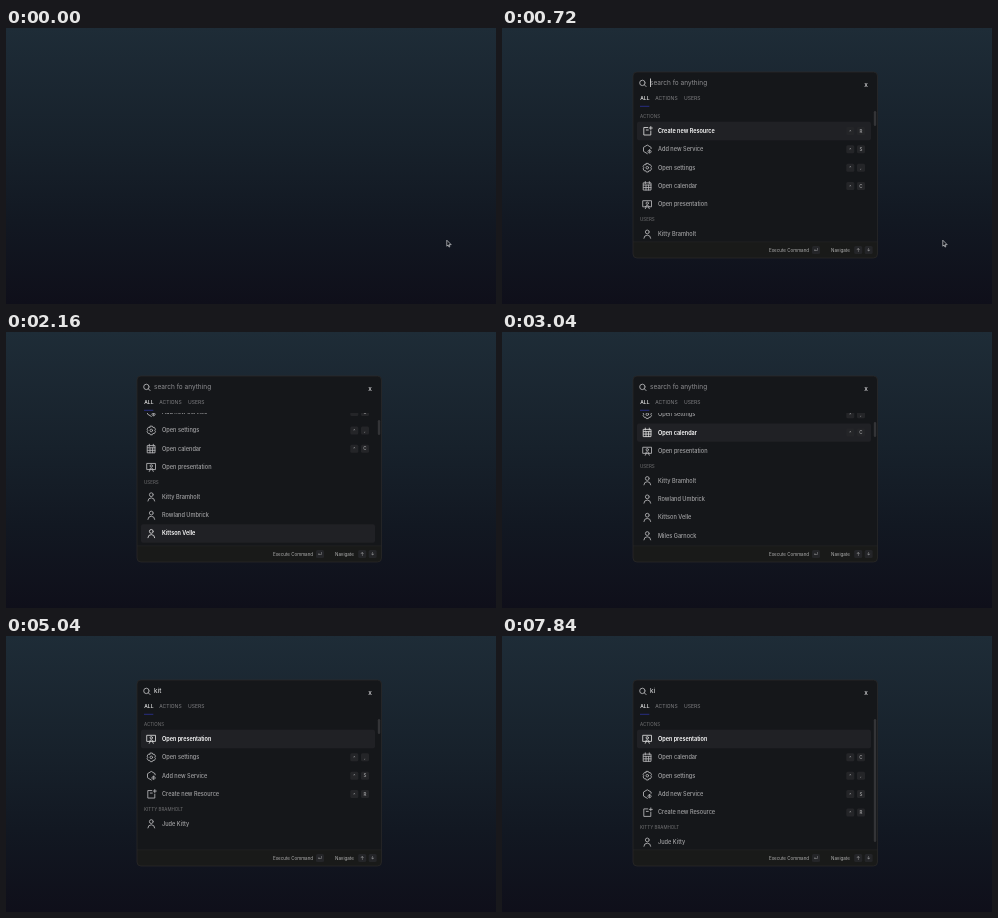
These frames come from a looping animation (490x276 px, 8000 ms). An HTML page with a canvas:

```html
<!DOCTYPE html>
<html lang="en">
<head>
<meta charset="utf-8">
<title>Command palette</title>
<style>
html, body { margin: 0; width: 100%; height: 100%; overflow: hidden; background: #0f0f1a; }
canvas { display: block; width: 490px; height: 276px; }
</style>
</head>
<body>
<canvas id="stage"></canvas>
<script>
const LOOP = 8000, W = 490, H = 276;
const canvas = document.getElementById('stage');
const scale = window.devicePixelRatio || 1;
canvas.width = W * scale;
canvas.height = H * scale;
const ctx = canvas.getContext('2d');

// Icons are drawn around their own centre.
const icons = {
  resource: 'M.5-3.5H-3.5V4H3.5V0M3.5-4.5V-1.5M2-3H5M-1-1H1',
  service: 'M3.8-.8V-2L0-4.3-3.8-2V2L0 4.3M2.2.5A1.6 1.6 0 1 0 2.3.5M2.3 1.2V3',
  settings: 'M-1-4.3H1L1.6-3 3-3.1 4.2-1.2 3.5 0 4.2 1.2 3 3.1 1.6 3 1 4.3H-1L-1.6 3-3 3.1-4.2 1.2-3.5 0-4.2-1.2-3-3.1-1.6-3ZM1.3 0A1.3 1.3 0 1 0-1.3 0A1.3 1.3 0 1 0 1.3 0',
  calendar: 'M-3.7-3.2H3.7V4H-3.7ZM-3.7-1H3.7M-2-4.5V-2.5M2-4.5V-2.5M-1.3-1V4M1.3-1V4M-3.7 1.5H3.7',
  presentation: 'M-4.2-3.7H4.2V2.4H-4.2ZM-2 4.3L-1 2.4M2 4.3L1 2.4M1.2-1.2A1.2 1.2 0 1 0-1.2-1.2A1.2 1.2 0 1 0 1.2-1.2M-2 2.2Q0-.7 2 2.2',
  user: 'M1.9-2.1A1.9 1.9 0 1 0-1.9-2.1A1.9 1.9 0 1 0 1.9-2.1M-3.4 4.2Q-3.2 1.1 0 1.1T3.4 4.2'
};
for (const name in icons) icons[name] = new Path2D(icons[name]);

const actions = [
  ['Create new Resource', 'resource', 'R'],
  ['Add new Service', 'service', 'S'],
  ['Open settings', 'settings', ','],
  ['Open calendar', 'calendar', 'C'],
  ['Open presentation', 'presentation']
];
const user = name => [name, 'user'];
const match = user('Jude Kitty');
const reversed = [...actions].reverse();

// A view is a list of groups: [heading, rows].
const views = {
  all: [['ACTIONS', actions],
        ['USERS', ['Kitty Bramholt', 'Rowland Umbrick', 'Kittson Velle', 'Miles Garnock'].map(user)]],
  few: [['ACTIONS', reversed], ['KITTY BRAMHOLT', [match]]],
  fewer: [['ACTIONS', reversed.filter(row => row[2] !== 'C')], ['KITTY BRAMHOLT', [match]]],
  one: [['KITTY BRAMHOLT', [match]]]
};

const keyTimes = [1200, 1360, 1520, 1680, 1840, 2000, 2160, 2320,
                  2480, 2560, 2720, 2880, 3040, 3120, 3280, 3360];
const typing = [[0, ''], [4640, 'k'], [4800, 'ki'], [5040, 'kit'], [5200, 'kitt'],
                [5520, 'kitty'], [7520, 'kitt'], [7680, 'kit'], [7840, 'ki']];
const rowY = i => 103 + 18.35 * i + (i > 4 ? 11.3 : 0);

function selectionAt(t) {
  let selected = 0, scroll = 0;
  keyTimes.forEach((time, i) => {
    if (t < time) return;
    selected += i < 8 ? 1 : -1;
    const y = rowY(selected);
    scroll = Math.min(Math.max(scroll, y - 201.5), y - 100.6);
    if (i < 8) scroll = Math.max(0, scroll);
  });
  return { selected, scroll: Math.max(0, scroll) };
}

function caretOn(t, query) {
  if (!query) return Math.floor((t - 320) / 500) % 2 === 0;
  return (t >= 6000 && t < 6480) || (t >= 7040 && t < 7520);
}

function text(str, x, y, size, color, weight = 400, align = 'left') {
  ctx.font = `${weight} ${size}px Inter, sans-serif`;
  ctx.textAlign = align;
  ctx.textBaseline = 'alphabetic';
  ctx.fillStyle = color;
  ctx.fillText(str, x, y + size * 0.36);
}

function box(x, y, w, h, r, color) {
  ctx.fillStyle = color;
  ctx.beginPath();
  ctx.roundRect(x, y, w, h, r);
  ctx.fill();
}

function line(path, x, y, color, width = 0.85) {
  ctx.save();
  ctx.translate(x, y);
  ctx.strokeStyle = color;
  ctx.lineWidth = width;
  ctx.lineJoin = ctx.lineCap = 'round';
  ctx.stroke(path);
  ctx.restore();
}

function keycap(label, x, y) {
  box(x - 4, y - 4, 8, 8, 1.5, '#242528');
  text(label, x, y, 4.5, '#a8a8aa', 500, 'center');
}

function drawBackground() {
  const g = ctx.createLinearGradient(0, 0, 0, H);
  [[0, '#1e2c37'], [0.42, '#17212b'], [0.7, '#121822'], [1, '#0f0f1a']]
    .forEach(stop => g.addColorStop(...stop));
  ctx.fillStyle = g;
  ctx.fillRect(0, 0, W, H);
}

function drawShine(t) {
  if (t >= 720) return;
  const x = 262 + (t - 560) * 0.6;
  const g = ctx.createLinearGradient(x, 0, x + 115, 0);
  [[0, 0.05], [0.2, 0.09], [0.4, 0.19], [0.6, 0.26], [0.8, 0.25], [1, 0.12]]
    .forEach(([at, a]) => g.addColorStop(at, `rgba(255,255,255,${a})`));
  ctx.save();
  ctx.globalAlpha *= t < 640 ? 1 : 0.4;
  ctx.fillStyle = g;
  ctx.fillRect(131, 44, 244.5, 170);
  ctx.restore();
}

function drawList(view, selected, scroll) {
  ctx.save();
  ctx.beginPath();
  ctx.rect(131, 81, 244, 132.5);
  ctx.clip();
  let index = 0, y = 88.3 - scroll;
  for (const [heading, rows] of view) {
    text(heading, 138, y, 4.5, '#727274');
    y += 14.7;
    for (const [label, icon, key] of rows) {
      const active = index++ === selected;
      if (active) box(135, y - 9.2, 234, 18.4, 2, '#202125');
      line(icons[icon], 145.3, y, active ? '#dcdcdc' : '#b9b9bb');
      text(label, 156, y, active ? 5.5 : 5.6, active ? '#fff' : '#a2a2a4', active ? 600 : 500);
      if (key) {
        keycap('^', 348.3, y);
        keycap(key, 359, y);
      }
      y += 18.35;
    }
    y -= 3.4;
  }
  ctx.restore();
}

function drawPanel(t) {
  const query = typing.filter(([time]) => t >= time).pop()[1];
  const name = ['all', 'few', 'few', 'fewer', 'fewer', 'one'][query.length];
  const { selected, scroll } = query ? { selected: name === 'one' ? -1 : 0, scroll: 0 } : selectionAt(t);

  ctx.save();
  ctx.globalAlpha = Math.min(1, (t - 320) / 160);
  box(131, 44, 244.5, 186, 4, '#15171a');
  drawShine(t);

  line(new Path2D('M2.4-.4A2.7 2.7 0 1 0-3-.4A2.7 2.7 0 1 0 2.4-.4M1.7 1.6L3.4 3.3'), 140.7, 55.3, '#bcbcbe');
  text(query || 'search fo anything', 148, 54.8, 6.5, query ? '#f2f2f2' : '#8e8e91');
  if (caretOn(t, query)) {
    ctx.fillStyle = '#e8e8e8';
    ctx.fillRect(148 + (query ? ctx.measureText(query).width : 0), 50.5, 0.8, 8.5);
  }
  text('X', 364, 56.8, 5, '#dedee0', 600, 'center');

  text('ALL', 138.3, 70, 5, '#f0f0f0', 500);
  text('ACTIONS', 153.3, 70, 5, '#828285');
  text('USERS', 182, 70, 5, '#828285');
  box(138, 77.8, 9.3, 1, 0, '#272c80');

  drawList(views[name], selected, scroll);

  const long = t >= 7520;
  if (long || t < 5520) box(371.8, 83 + scroll * 0.12, 2.4, long ? 123 : 15, 1.2, '#333437');

  box(131, 214, 244.5, 16, [0, 0, 4, 4], '#191a19');
  ctx.fillStyle = '#242423';
  ctx.fillRect(131, 213.6, 244.5, 0.7);
  text('Execute Command', 267, 222, 4.5, '#b0b0b0');
  text('Navigate', 329, 222, 4.5, '#b0b0b0');
  for (const [label, x] of [['↵', 314], ['↑', 356.2], ['↓', 366.7]]) keycap(label, x, 222);

  ctx.strokeStyle = '#2b2a2a';
  ctx.lineWidth = 0.7;
  ctx.beginPath();
  ctx.roundRect(131, 44, 244.5, 186, 4);
  ctx.stroke();
  ctx.restore();
}

function drawCursor() {
  const arrow = new Path2D('M0 0V5.6L1.3 4.4 2.2 6.5 3 6.1 2.2 4.1H4Z');
  ctx.save();
  ctx.translate(440.8, 212.6);
  ctx.fillStyle = '#0c0f15';
  ctx.fill(arrow);
  ctx.restore();
  line(arrow, 440.8, 212.6, '#d4d6d8', 0.7);
}

function frame(now) {
  const t = now % LOOP;
  ctx.setTransform(scale, 0, 0, scale, 0, 0);
  drawBackground();
  if (t >= 400) drawPanel(t);
  if (t < 1200) drawCursor();
  requestAnimationFrame(frame);
}
requestAnimationFrame(frame);
</script>
</body>
</html>
```
